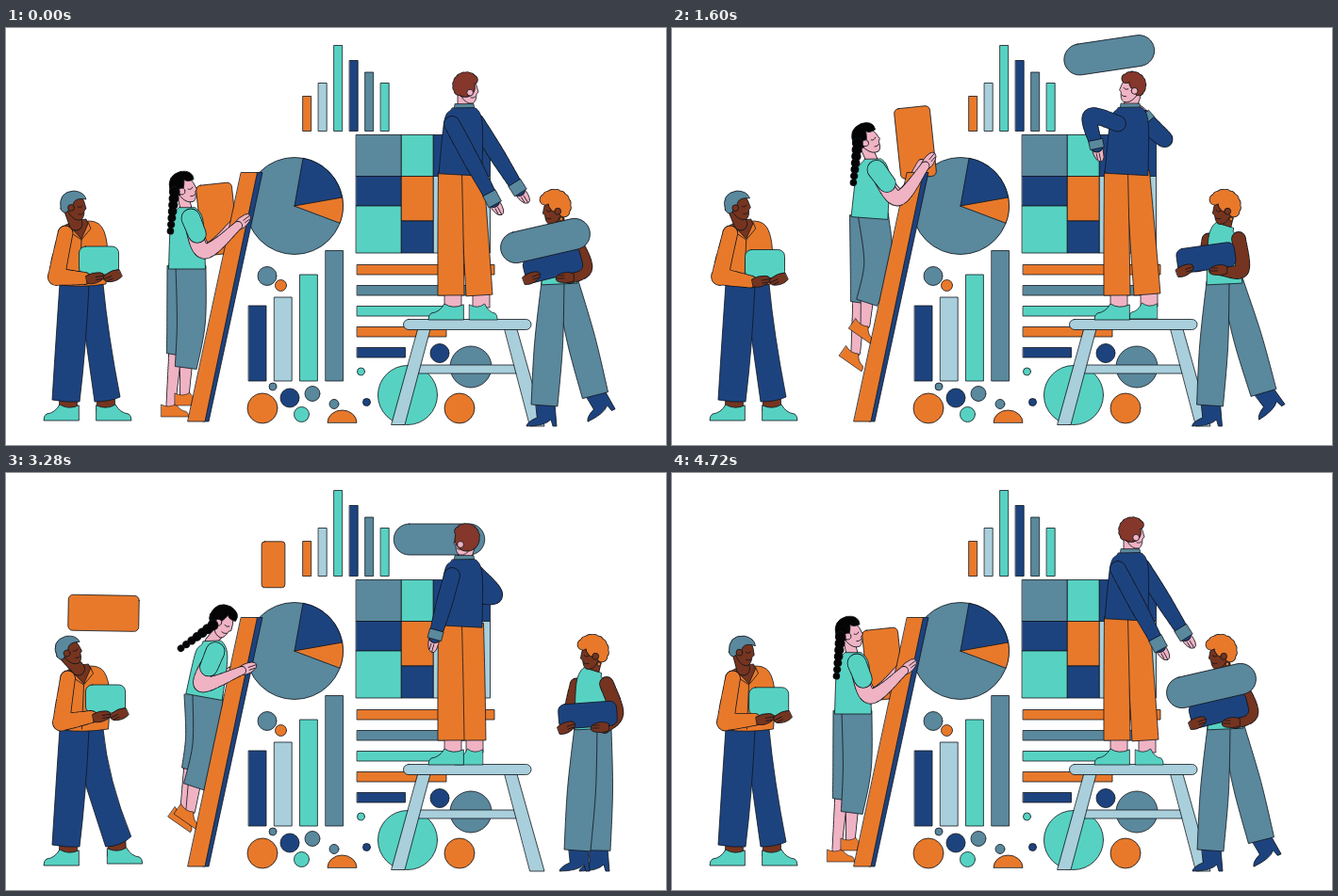
Animation, 700 px wide and 443 px high, one loop 4800 ms. Source, as an HTML page with a canvas:

```html
<!DOCTYPE html>
<html lang="en">
<head>
<meta charset="utf-8">
<title>Building charts together</title>
<style>
html, body { margin: 0; width: 100%; height: 100%; overflow: hidden; background: #fff; }
canvas { display: block; width: 700px; height: 443px; }
</style>
</head>
<body>
<canvas id="stage" width="700" height="443"></canvas>
<script>
const c = document.getElementById('stage').getContext('2d');
const LOOP = 4800, STEP = 80, TAU = Math.PI * 2, RAD = Math.PI / 180;
const ink = '#10151c', orange = '#e8792b', navy = '#1d437f', slate = '#5a889c', teal = '#57d2c2',
  light = '#a8cfdb', pink = '#efb3c4', brown = '#75341f', chestnut = '#84372a', black = '#050505';

// ---- motion ----
const ramp = (t, a, b) => Math.min(Math.max((t - a) / (b - a), 0), 1);
const smooth = u => u * u * (3 - 2 * u);
const ease = (t, a, b) => smooth(ramp(t, a, b));
const lerp = (a, b, u) => a + (b - a) * u;
const mix = (a, b, u) => a.map((v, i) => lerp(v, b[i], u));
// Eases through one value (or point) per beat, returning to the first
const beats = [0, 1200, 2000, 2560, 3280, 3920, 4720, LOOP];
function track(t, keys) {
  const i = beats.findLastIndex(b => b <= t), u = ease(t, beats[i], beats[i + 1]);
  const a = keys[i] ?? keys[0], b = keys[i + 1] ?? keys[0];
  return Array.isArray(a) ? mix(a, b, u) : lerp(a, b, u);
}
// Elbow of a two-bone arm from shoulder s to wrist w; a far wrist stretches it straight
function elbow(s, w, upper, lower, side) {
  const dx = w[0] - s[0], dy = w[1] - s[1], d = Math.hypot(dx, dy);
  if (d >= upper + lower) return mix(s, w, upper / (upper + lower));
  const along = (upper ** 2 - lower ** 2 + d * d) / (2 * d);
  const out = side * Math.sqrt(Math.max(upper ** 2 - along ** 2, 0));
  return [s[0] + (dx * along - dy * out) / d, s[1] + (dy * along + dx * out) / d];
}

// ---- drawing helpers ----
function paint(path, fill) {
  if (typeof path === 'string') path = new Path2D(path);
  if (fill) { c.fillStyle = fill; c.fill(path); }
  c.stroke(path);
}
function at(x, y, deg, draw, sx = 1, sy = sx) {
  c.save();
  c.translate(x, y);
  c.rotate(deg * RAD);
  c.scale(sx, sy);
  draw();
  c.restore();
}
function box(x, y, x2, y2, fill, r = 0) {
  const p = new Path2D();
  p.roundRect(x, y, x2 - x, y2 - y, r);
  paint(p, fill);
}
function disc(x, y, r, fill) {
  const p = new Path2D();
  p.arc(x, y, r, 0, TAU);
  paint(p, fill);
}
const slab = (x, y, deg, w, h, r, fill, s = 1) =>
  at(x, y, deg, () => box(-w * s / 2, -h * s / 2, w * s / 2, h * s / 2, fill, r * s));

// Union of circles with a single outline
function blobs(list, fill) {
  for (const [grow, color] of [[.4, ink], [-.4, fill]]) {
    c.beginPath();
    for (const [x, y, r] of list) {
      c.moveTo(x + r, y);
      c.arc(x, y, Math.max(r + grow, 0), 0, TAU);
    }
    c.fillStyle = color;
    c.fill();
  }
}
// Catmull-Rom samples through [x, y, halfWidth] points
function spline(pts, n = 24) {
  const out = [];
  for (let i = 0; i < pts.length - 1; i++) {
    const [p, q, r, s] = [-1, 0, 1, 2].map(k => pts[Math.min(Math.max(i + k, 0), pts.length - 1)]);
    for (let j = 0; j < n; j++) {
      const u = j / n;
      out.push(q.map((v, k) => v + u / 2 * (r[k] - p[k] +
        u * (2 * p[k] - 5 * v + 4 * r[k] - s[k] + u * (3 * (v - r[k]) + s[k] - p[k])))));
    }
  }
  out.push(pts[pts.length - 1]);
  return out;
}
const tube = (pts, fill) => blobs(spline(pts), fill);
// Tapered strip with flat ends
function ribbon(pts, fill) {
  const line = spline(pts, 10), left = [], right = [];
  line.forEach(([x, y, w], i) => {
    const a = line[Math.max(i - 1, 0)], b = line[Math.min(i + 1, line.length - 1)];
    const d = Math.atan2(b[1] - a[1], b[0] - a[0]), nx = Math.sin(d) * w, ny = -Math.cos(d) * w;
    left.push([x + nx, y + ny]);
    right.unshift([x - nx, y - ny]);
  });
  paint('M' + [...left, ...right].join('L') + 'Z', fill);
}
const hand = (x, y, deg, skin, flip = 1) => at(x, y, deg, () =>
  paint('M-2-4Q5-7 13-5Q17-4 17-1Q16 3 12 4Q4 7-2 4ZM8-1L16-1M8 2L14 2', skin), 1, flip);
const handAfter = (e, w, skin) => hand(w[0], w[1], Math.atan2(w[1] - e[1], w[0] - e[0]) / RAD, skin);
const shoe = (x, y, fill, sx = 1, deg = 0, sy = 1) => at(x, y, deg, () =>
  paint('M13 4Q2 9-7 3Q-12 12-21 13Q-24 15-24 20H13Z', fill), sx, sy);
const boot = (x, y, deg) => at(x, y, deg, () =>
  paint('M-9-2L11-2L13 22H9L7 15Q0 22-19 22Q-18 17-8 13Z', navy));
function curls(size, r, fill, away = 0) {
  const list = [[-4, -6, size - 1.5], [-1, -1, 13 * away]];
  for (let a = 145; a <= 325; a += 22) list.push([Math.cos(a * RAD) * size, Math.sin(a * RAD) * size - 3, r]);
  blobs(list, fill);
}
// Head facing right (dir 1) or left (-1); `away` turns the face out of sight
function head(x, y, dir, tilt, skin, drawHair, away = 0) {
  at(x, y, tilt * dir, () => {
    paint('M-6-10Q8-14 11-3L13 4L11 6Q11 14 7 16Q0 17-5 9Q-12 0-6-10Z', skin);
    paint('M4 2q3 2 5-1M5 10q3 1 5-1');
    drawHair();
    disc(-3 + away * 9, 3 + away * 2, 3.4, skin);
  }, dir, 1);
}

// ---- scenery ----
const bars = (x, pitch, width, base, list) => list.forEach(([top, fill], i) =>
  box(x + i * pitch, top, x + i * pitch + width, base, fill));
function charts() {
  bars(315, 16.5, 8.7, 109.5, [[72.5, orange], [58.5, light], [18.5, teal], [34.5, navy], [47, slate], [58.5, teal]]);
  bars(257.5, 27.2, 18.5, 375, [[295, navy], [286, light], [262, teal], [236.5, slate]]);
  [[518, orange], [498, slate], [482, teal], [467, orange], [423.5, navy]]
    .forEach(([x, fill], i) => box(372.5, 251.5 + i * 22, x, 262 + i * 22, fill));

  disc(306, 189, 51.5, slate);
  paint('M306 189L315 138.3A51.5 51.5 0 0 1 356.7 180Z', navy);
  paint('M306 189L356.7 180A51.5 51.5 0 0 1 354.3 207Z', orange);

  const mosaic = [[371.5, [157.5, slate], [189, navy], [239, teal]],
    [419.5, [157.5, teal], [205, orange], [239, navy]], [453.5, [157.5, navy], [239, light]]];
  mosaic.forEach(([x, ...cells], i) => cells.reduce((top, [bottom, fill]) => {
    box(x, top, mosaic[i + 1]?.[0] ?? 513.5, bottom, fill);
    return bottom;
  }, 113.5));

  [[277, 263.5, 10, slate], [291.5, 273.5, 6, orange], [283, 381, 4, slate], [301, 393, 10, navy],
    [325, 388.5, 8, slate], [272, 404, 16, orange], [313.5, 410.5, 8, teal], [348, 399.5, 5, slate],
    [382.5, 397.5, 4, navy], [376.5, 365, 4, teal], [426, 390, 31.5, teal], [460, 345.5, 10, navy],
    [493, 360, 22, slate], [481, 404, 16, orange]].forEach(d => disc(...d));
  paint('M341 419A15.5 13 0 0 1 372 419Z', orange);
}
function stool() {
  box(438, 358, 543, 367, light);
  paint('M437 320L450 320L423 421.5H409Z', light);
  paint('M529 320H542L571 423H556Z', light);
  box(421.5, 309.5, 557, 320.5, light, 5.5);
}
const ladderEdge = y => 249.5 - (y - 153.5) * .2136;
function ladder() {
  paint('M265 153.5H272L215 418H209Z', navy);
  paint('M249.5 153.5H266.5L211 418H193Z', orange);
}

// ---- man with the teal box: everything follows his sway ----
function carrier(t) {
  const sway = track(t, [0, 0, -5, 0, 5, -6, 3]), lookUp = track(t, [0, 1, 0, 0, 1.3, -1, -.7]);
  const foot = Math.max(sway, 0) * 1.8 * Math.max(lookUp, 0), lean = sway / 2;
  const bx = 77.5 + Math.max(sway, 0) * 1.4, by = 232 - sway * 1.4, hx = 72 - lookUp * 4;
  ribbon([[66, 392, 9], [66, 407, 10]], brown);
  ribbon([[106 + foot, 388, 9], [106 + foot, 407, 10]], brown);
  shoe(64, 397, teal);
  shoe(109 + foot, 397 - foot / 6, teal, -1);
  paint(`M79 272H103Q108 325 ${121 + foot} ${392 - foot / 2}Q${110 + foot} 397 ${94 + foot} 397L85 333Z`, navy);
  paint('M57 272H88Q85 340 78 397Q64 398 49 395Q53 330 57 272Z', navy);
  at(lean, 0, 0, () => {
    paint('M60 212Q64 207 72 207L88 205Q100 205 104 216Q108 226 108 245L106 272Q80 276 57 273Q58 250 58 235Z', orange);
    paint('M68 205L85 203L87 208L80 224L67 210Z', brown);
    paint('M67 207L62 213L80 225L78 272M87 206L90 213L80 225');
  });
  tube([[hx - 3, 194, 7], [74 + lean, 208, 7]], brown);
  head(hx, 188, 1, -10 * lookUp, brown, () =>
    paint('M-14 4Q-17-14 0-15Q11-14 13-6Q3-8 0-3Q-1 2-4 3Q-6 6-8 8Q-12 9-14 4Z', slate));
  box(bx, by, bx + 42, by + 30, teal, 7);
  tube([[63 + lean, 218, 8], [54.5 + sway, 260, 9], [57 + sway, 264, 9], [bx + 6, by + 34, 6.5]], orange);
  hand(bx + 10, by + 35, -10, brown);
  hand(bx + 42, by + 29, 155, brown, -1);
}

// ---- woman on the ladder: feet slide along the ladder, arms reach for the wrist point ----
function climber(t) {
  const hip = track(t, [[192, 256], [208, 212], [211, 192], [208, 206], [210, 238], [191, 264]]);
  const wrist = track(t, [[246, 210], [249, 183], [288, 110], [270, 117], [250, 210], [241, 219]]);
  const lean = track(t, [0, 0, 7, 10, 8, -1]), tilt = track(t, [-12, -25, -16, -15, 30, -22]);
  const away = track(t, [0, 0, 0, 0, 0, 1]);
  const frontY = track(t, [388, 318, 312, 315, 358, 388]), backY = track(t, [400, 350, 338, 350, 361, 400]);
  const [sx, sy] = [hip[0] + lean, hip[1] - 51 + Math.abs(lean) * .7];
  const [hx, hy] = [sx + 1 + tilt * .35, sy - 35];

  const leg = (side, footY, gap, hemAt, w) => {
    const top = [hip[0] + side, hip[1] - 3], foot = [ladderEdge(footY) - gap, footY];
    const hem = mix(top, foot, hemAt), knee = mix(top, foot, hemAt * .55);
    knee[0] += 3 + Math.max(136 - foot[1] + top[1], 0) * .3;
    const slope = 35 * ramp(390, backY + 15, backY - 15);
    tube([[...mix(hem, top, .08), 7], [...foot, 5]], pink);
    shoe(foot[0], footY - 3, orange, -.78, 35 * ramp(backY, 400, 365), .8);
    ribbon([[...top, 16], [...knee, 15], [...hem, w]], slate);
  };
  const farShoulder = [sx + 6, sy - 4], farWrist = mix([wrist[0] - 4, wrist[1] - 3], [sx - 18, sy + 14], away);
  const farElbow = mix(elbow(farShoulder, farWrist, 36, 40, 1), [sx - 32, sy + 31], away);
  tube([[...farShoulder, 7], [...farElbow, 6], [...farWrist, 4]], pink);
  leg(-5, backY, 14 + 8 * ramp(backY, 350, 400), .64, 9);
  leg(4, frontY, 10, .8, 11.5);
  tube([[hx - 1, hy + 8, 6], [sx - 1, sy - 13, 6]], pink);
  ribbon([[sx, sy - 14, 9], [sx, sy, 17], [...hip, 19.5]], teal);
  head(hx, hy, 1, tilt, pink, () => {
    paint('M-15 0Q-16-17 0-18Q13-17 12-7Q4-5 2-9Q0 2-5 6Q-13 10-15 0Z', black);
    if (away > .05) blobs([[-1, -3, 13 * away]], black);
  }, away);
  at(hx - 10 + 8 * away, hy + 4, 6 + Math.max(tilt, 0) * 1.6, () =>
    blobs(Array.from({ length: 7 }, (_, i) => [0, i * 7, 5.5 - i * .35]), black));
  ladder();
  const shoulder = [sx + 4, sy - 3], bend = elbow(shoulder, wrist, 38, 45, 1);
  handAfter(bend, wrist, pink);
  tube([[...shoulder, 8], [...bend, 8], [...wrist, 4.5]], pink);
  tube([[...shoulder, 10], [...mix(shoulder, bend, .48), 9.5]], teal);
}

// ---- man on the stool ----
function builder(t) {
  const waist = track(t, [156, 148, 163, 163, 163, 160]), stride = track(t, [30, 41, 23, 23, 23, 27]);
  const near = track(t, [[517, 184], [455, 84], [446, 167], [480, 176], [455, 174], [457, 172]]);
  const far = track(t, [[544, 172], [517, 58], [486, 130], [486, 130], [486, 130], [515, 170]]);
  const dir = Math.sign(track(t, [1, -1, -1, -1, -1, 1])) || 1, away = track(t, [.8, 0, 0, 0, 1, 1]);
  const tilt = track(t, [0, -15, 0, 0, 0, 0]);
  const hipX = 482, [sx, sy] = [485, waist - 57], [hx, hy] = [488, waist - 92];

  const arm = (s, wrist, out) => {
    const e = elbow(s, wrist, 30, 32, wrist[1] < s[1] ? out : -out);
    handAfter(e, wrist, pink);
    tube([[...s, 8.5], [...e, 8.5], [...wrist, 6.5]], navy);
    ribbon([[...mix(e, wrist, .8), 7.5], [...mix(e, wrist, 1.08), 7.5]], slate);
  };
  const leg = (side, x, y, size) => {
    ribbon([[x + 2, y - 4, 9], [x + 2, y + 13, 9]], pink);
    shoe(x, y + 6, teal, size);
    ribbon([[hipX + side, waist - 3, 12.5], [(hipX + side + x) / 2, (waist + y) / 2, 13.5], [x, y, 14]], orange);
  };
  leg(12, 472 + stride, 284 - Math.max(stride - 30, 0) * .5, .8 * -dir);
  leg(-11, 472, 284, 1);
  arm([sx + 14, sy + 1], far, 1);
  tube([[hx - 2 * dir, hy + 8, 7], [sx + 1, sy - 15, 7]], pink);
  ribbon([[sx + 1, sy - 18, 10], [sx + 1, sy - 13, 11]], slate);
  ribbon([[sx, sy - 14, 12], [sx, sy, 20], [hipX, waist, 23]], navy);
  head(hx, hy, dir, tilt, pink, () => curls(9.5, 5, chestnut, away), away);
  arm([sx - 12, sy + 3], near, -1);
}

// ---- woman with the navy block: arms hold on to the block, a wide stride lifts the rear heel ----
function helper(t) {
  const hipX = track(t, [587, 584, 588, 621, 622, 622]), hx = track(t, [582, 589, 583, 626, 622, 622]);
  const frontX = track(t, [571, 570, 571, 582, 606, 606]), rearX = track(t, [625, 630, 625, 624, 627, 627]);
  const [bx, by] = track(t, [[580, 252], [553, 236], [580, 252], [615, 249], [617, 257], [618, 252]]);
  const turn = track(t, [-14, -2, -14, -5, -4, -2]);
  const sx = hipX - 2, sy = 223, lift = Math.max(rearX - frontX - 42, 0) * .9;
  const leg = (side, x, y, deg) => {
    boot(x, y, deg);
    ribbon([[hipX + side, 270, 12], [(hipX + side + x) / 2, (272 + y) / 2, 15], [x, y, 14]], slate);
  };
  leg(8, rearX, 401 - lift, -2.3 * lift);
  leg(-7, frontX, 401, 0);
  tube([[sx - 15, sy + 2, 7], [sx - 22, sy + 28, 6], [bx - 22, by + 8, 5]], brown);
  tube([[hx + 3, 200, 6.5], [sx + 2, sy - 10, 6.5]], brown);
  ribbon([[sx + 3, sy - 13, 9], [sx, sy, 15], [hipX, 272, 19]], teal);
  head(hx, 192, -1, 5, brown, () => curls(12, 5.8, orange));
  disc(hx + 7, 203, 2, orange);
  const shoulder = [sx + 17, sy + 1], grip = [bx + 18, by + 14];
  tube([[...shoulder, 7.5], [...elbow(shoulder, grip, 33, 20, -1), 7.5], [...grip, 5.5]], brown);
  slab(bx, by, turn, 62, 26, 7, navy);
  hand(bx - 29, by + 16, -20, brown);
  hand(bx + 20, by + 13, 180, brown);
}

// ---- loose pieces ----
const tile = (x, y, deg, s = 1) => slab(x, y, deg, 38, 75, 5, orange, s);
const pill = (x, y, deg, s = 1) => slab(x, y, deg, 96.5, 33, 16.5, slate, s);

// Carried up the ladder, then shrinks away
function liftedTile(t) {
  const [x, y] = track(t, [[224, 203], [234, 159], [282, 84], [283.5, 78.5], [283.5, 78.5]]);
  const s = 1 - ramp(t, 2720, 3670) ** 2;
  tile(x, y + 54 * (1 - s), -6 + 6 * ease(t, 1600, 2560), s);
}
// Pops up, drops to the left man and is handed over
function nextTile(t) {
  const pass = ease(t, 3920, 4720);
  tile(103.5 + 120.5 * pass, 141 + 75 * ease(t, 3120, 3920) - 13 * pass, 91 - 97 * pass, ramp(t, 2880, 3120));
}
// Raised overhead, set in place, then sinks behind the mosaic
function liftedPill(t) {
  const up = ease(t, 400, 1200), place = ramp(t, 1200, 2000), set = smooth(place);
  pill(572 - 104 * up - 8.5 * set,
    226 - 169 * up + 13.5 * set - 35 * Math.sin(Math.PI * place) + 72 * ease(t, 3440, 4600),
    -13 - 4 * up + 17 * set);
}
function nextPill(t) {
  const fall = ease(t, 4000, 4720);
  pill(588 - 16 * fall, 150 + 76 * fall, -4 - 9 * fall, ramp(t, 4000, 4240));
}

function draw(t) {
  c.fillStyle = '#fff';
  c.fillRect(0, 0, 700, 443);
  c.strokeStyle = ink;
  c.lineWidth = .8;
  c.lineJoin = c.lineCap = 'round';
  if (t >= 2000 && t < 4600) liftedPill(t);
  if (t >= 2560 && t < 3670) liftedTile(t);
  charts();
  stool();
  carrier(t);
  if (t < 2560) liftedTile(t);
  if (t > 2880) nextTile(t);
  climber(t);
  helper(t);
  if (t < 2000) liftedPill(t);
  if (t > 4000) nextPill(t);
  builder(t);
}
function tick() {
  draw(Math.floor(performance.now() % LOOP / STEP) * STEP);
  requestAnimationFrame(tick);
}
tick();
</script>
</body>
</html>
```
